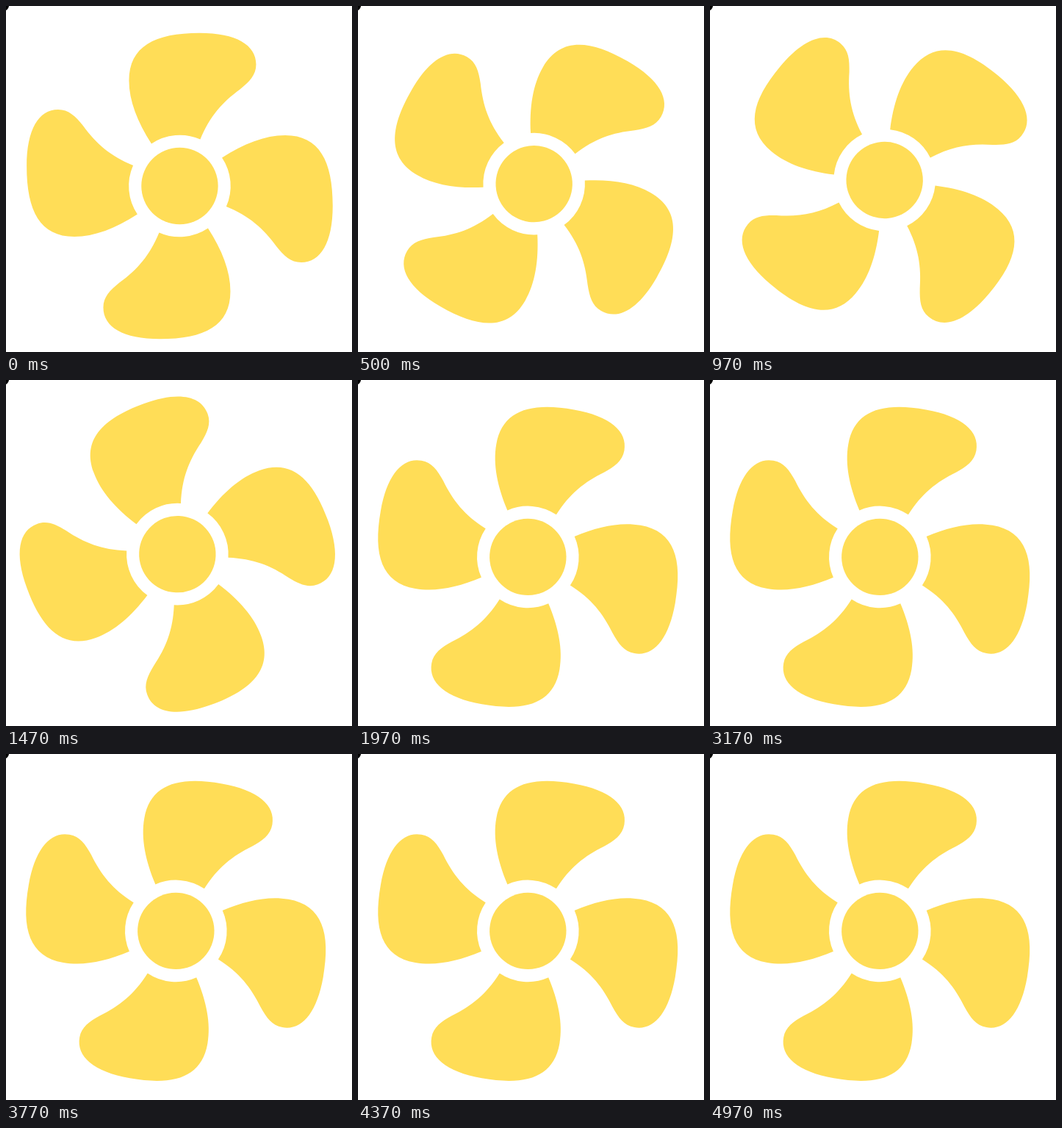
Recreate the animation shown at these times as an HTML page. Size 471 by 471 pixels, loop 5.01 s.

```html
<!DOCTYPE html>
<html lang="en">
<head>
<meta charset="utf-8">
<title>Spinning fan</title>
<style>
  html, body { margin: 0; width: 100%; height: 100%; overflow: hidden; background: #fff; }
  svg { display: block; width: 100%; height: 100%; }
  #fan { fill: #ffdd57; }
</style>
</head>
<body>
<svg viewBox="0 0 471 471">
  <defs>
    <path id="blade" d="M-38.5 -57.6
      C-57.5 -87 -69 -116 -69 -143.5
      C-69 -190 -34 -208.3 27 -208.3
      C77 -208.3 104 -192 104 -165.5
      C104 -151 95 -142 82 -131.5
      C58 -114 41 -95 28 -63.4
      A69.3 69.3 0 0 0 -38.5 -57.6Z"/>
  </defs>
  <path d="M0 0H4Q3.6 3.6 0 6Z"/>
  <!-- The hub sits slightly off the pivot, so the fan wobbles. -->
  <g transform="translate(235.6 240.8)">
    <g id="fan">
      <g transform="translate(.85 4.2)">
        <circle r="52.2"/>
        <use href="#blade"/>
        <use href="#blade" transform="rotate(90)"/>
        <use href="#blade" transform="rotate(180)"/>
        <use href="#blade" transform="rotate(270)"/>
      </g>
    </g>
  </g>
</svg>
<script>
  const LOOP = 5010, LAST_STEP = 149, STEP_ANGLE = 20;
  const fan = document.getElementById('fan');
  const start = performance.now();

  // Three steps per 100 ms, at 0, 30 and 70 ms.
  function stepAt(ms) {
    const rest = ms % 100;
    const step = Math.floor(ms / 100) * 3 + (rest >= 30) + (rest >= 70);
    return Math.min(step, LAST_STEP);
  }

  function draw() {
    const ms = (performance.now() - start) % LOOP;
    fan.setAttribute('transform', `rotate(${stepAt(ms) * STEP_ANGLE % 360})`);
    requestAnimationFrame(draw);
  }
  draw();
</script>
</body>
</html>
```
